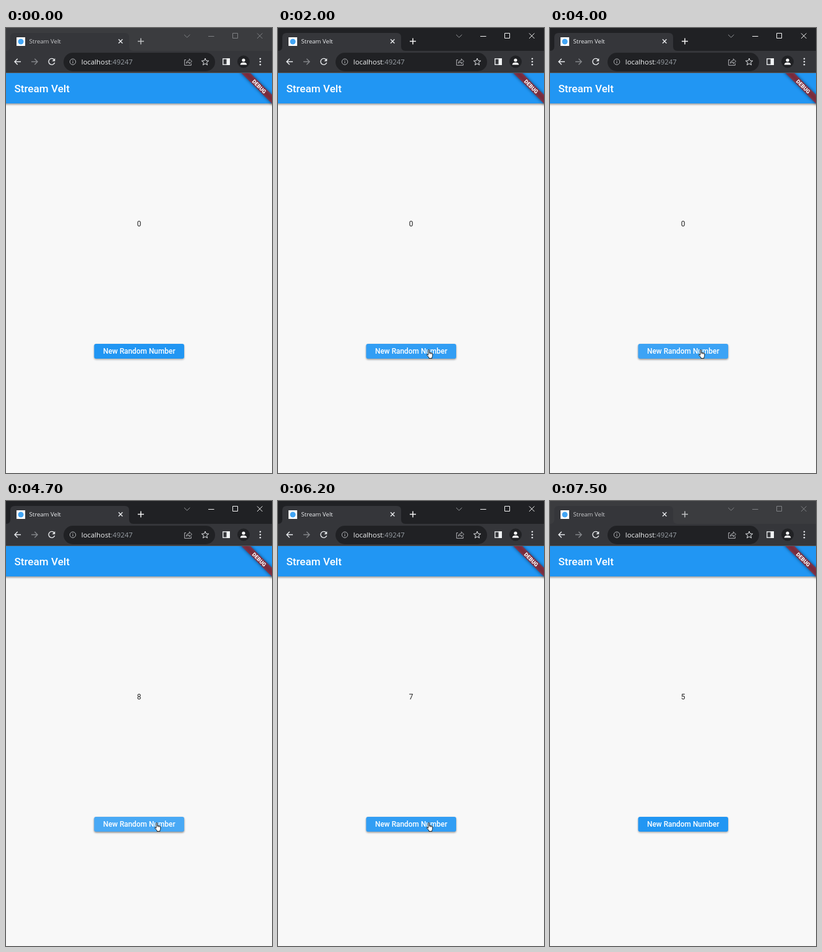
An HTML page for the animation above (7600 ms loop, 430 by 720 pixels).

```html
<!DOCTYPE html>
<html lang="en">
<head>
<meta charset="utf-8">
<title>Random number stream</title>
<style>
html, body { margin: 0; width: 100%; height: 100%; overflow: hidden; background: #f8f8f8; }
svg { display: block; }
.ui { font-family: "Open Sans", "Noto Sans", sans-serif; }
.app { font-family: Roboto, sans-serif; }
.line { fill: none; stroke: #e8eaed; stroke-width: 1.4; }
.thin { stroke-width: 1; }
#strip { fill: #3b3c3f; }
#tabTitle { fill: #c9cacc; }
#plus { stroke: #c0c1c3; }
#controls { stroke: #7f8184; }
.active #strip { fill: #202124; }
.active #tabTitle { fill: #eceef0; }
.active #plus, .active #controls { stroke: #f4f4f4; }
.active #chevron { stroke: #96989b; }
</style>
</head>
<body>
<svg id="stage" width="430" height="720" viewBox="0 0 430 720">
  <defs>
    <filter id="soft" x="-30%" y="-100%" width="160%" height="300%"><feGaussianBlur stdDeviation="1.6"/></filter>
    <filter id="blur" x="-30%" y="-100%" width="160%" height="300%"><feGaussianBlur stdDeviation="2.6"/></filter>
    <clipPath id="page"><rect y="73" width="430" height="647"/></clipPath>
    <clipPath id="face"><rect x="142.5" y="511" width="145.5" height="24" rx="3.2"/></clipPath>
  </defs>
  <rect width="430" height="720" fill="#f8f8f8"/>

  <g class="ui">
    <rect id="strip" width="430" height="37"/>
    <path d="M0 37Q7 37 7 30V15Q7 8 14 8H192Q199 8 199 15V30Q199 37 206 37H430V73H0Z" fill="#35363a"/>
    <rect x="17" y="15" width="14" height="14" fill="#fff"/>
    <circle cx="24" cy="22" r="4.5" fill="#42a5f5"/>
    <text id="tabTitle" x="37.5" y="25.3" font-size="9.6">Stream Velt</text>
    <path class="line" d="M182 18.3l6.4 6.4m0-6.4l-6.4 6.4"/>
    <path id="plus" d="M213 21.5h10m-5-5v10" stroke-width="1.5"/>
    <g id="controls" fill="none">
      <path id="chevron" d="M288 10.8l4.7 4.5 4.7-4.5"/>
      <path d="M327 13.5h9.5M366.5 8.500h8v8h-8zM406 8.500l8.500 8.500m0-8.500l-8.500 8.500"/>
    </g>

    <path class="line" d="M24 54.500H14m4.700-4.700L14 54.500l4.700 4.700"/>
    <path class="line" d="M41 54.500h10m-4.700-4.700l4.700 4.700-4.700 4.700" style="stroke:#85878b"/>
    <path class="line" d="M77.900 51.300A5 5 0 1 0 78.700 56"/>
    <path d="M79.300 49v4.800h-4.800z" fill="#e8eaed"/>
    <rect x="93" y="40" width="245" height="30" rx="15" fill="#202124"/>
    <g class="line thin" style="stroke:#b4b6b9">
      <circle cx="108" cy="54.700" r="4.700"/>
      <path d="M108 53.900v3.300m0-5.200v1.100"/>
      <path d="M291 51.500h-2.300v8.800h10.600v-3M291.300 57q.5-4.200 5-4.500v-2.600l4.200 4-4.200 4v-2.500q-3.300 0-5 1.600z"/>
    </g>
    <text x="121.800" y="58.800" font-size="11.350" fill="#f1f3f4">localhost<tspan fill="#9aa0a6">:49247</tspan></text>
    <path id="star" class="line thin"/>
    <rect x="350.800" y="49.800" width="10.400" height="9.400" class="line"/>
    <rect x="356.500" y="49" width="5.400" height="11" fill="#f1f3f4"/>
    <circle cx="384" cy="54.500" r="10" fill="#202124"/>
    <circle cx="384" cy="52" r="2.600" fill="#fff"/>
    <path d="M378.700 59.600q0-3.800 5.300-3.800t5.300 3.800z" fill="#fff"/>
    <g fill="#e8eaed"><circle cx="411" cy="49.800" r="1.300"/><circle cx="411" cy="54.500" r="1.300"/><circle cx="411" cy="59.200" r="1.300"/></g>
    <rect y="72" width="430" height="1" fill="#55585c"/>
  </g>

  <g class="app" clip-path="url(#page)">
    <rect x="-9" y="76" width="448" height="48" fill="#000" opacity=".36" filter="url(#soft)"/>
    <rect y="73" width="430" height="49" fill="#2196f3"/>
    <text x="13.500" y="104.300" font-size="17.100" font-weight="500" fill="#fff">Stream Velt</text>
    <g transform="translate(430 74) rotate(45)">
      <rect x="-40" y="24" width="80" height="10.300" opacity=".55" filter="url(#blur)"/>
      <rect x="-40" y="24" width="80" height="10.300" fill="#b71c1c" fill-opacity=".63"/>
      <text y="32.300" font-size="8.700" font-weight="900" fill="#fff" text-anchor="middle">DEBUG</text>
    </g>
    <text id="number" x="215" y="321" font-size="12" fill="#222" text-anchor="middle">0</text>

    <rect id="shade" x="142.500" y="512.500" width="145.500" height="24" rx="3.200" filter="url(#soft)"/>
    <g clip-path="url(#face)">
      <rect x="142" y="510" width="147" height="26" fill="#2196f3"/>
      <rect id="tint" x="142" y="510" width="147" height="26" fill="#fff"/>
      <circle id="splash" cy="523" fill="#fff"/>
    </g>
    <text x="215.300" y="527.200" font-size="11.900" font-weight="500" fill="#fff" text-anchor="middle">New Random Number</text>
  </g>

  <g id="hand" fill="#fff" stroke="#111" stroke-width=".9" stroke-linejoin="round">
    <path d="M2.800 8.500V1.600q0-1.100 1-1.100t1 1.100v3.600l4 .8q1 .3 1 1.300v3q0 1.400-.9 2.500v1.700H4v-1.500L.9 9.600Q.2 8.400 1 8t1.800 1.400z"/>
    <path d="M4.800 5v2.400M6.500 5.600v2M8.200 6v1.800" stroke-width=".7"/>
  </g>
  <path id="arrow" d="M0 0V9.600L2.200 7.600 3.800 11 5.200 10.400 3.700 7H6.600Z" fill="#fff" stroke="#111" stroke-width=".8"/>
</svg>
<script>
const LOOP = 7600, STEP = 100;
const FOCUS = [1200, 7500];
const HOVER = [1800, 6800];
// press time and the number it brings
const CLICKS = [[2300, 3], [2900, 6], [3500, 0], [4300, 8], [5100, 0], [5600, 7], [6300, 5]];
const RELEASE = 100;
// time, x, y of the pointer tip
const PATH = [
  [1100, 300, 636], [1300, 300, 636], [1700, 262, 556], [1800, 250, 521],
  [2000, 243, 520], [6700, 243, 520], [6800, 268, 556], [7000, 346, 676], [7100, 346, 676]
];

const $ = id => document.getElementById(id);
const stage = $('stage');
const clamp = v => Math.max(0, Math.min(1, v));
const ramp = (t, a, b) => clamp((t - a) / (b - a));
const mix = (a, b, p) => a + (b - a) * p;
const within = (t, [a, b]) => t >= a && t < b;
const set = (id, attrs) => {
  for (const key in attrs) $(id).setAttribute(key, attrs[key]);
};

function starPath(cx, cy, outer, inner) {
  const points = Array.from({ length: 10 }, (_, i) => {
    const r = i % 2 ? inner : outer, a = i * Math.PI / 5 - Math.PI / 2;
    return (cx + r * Math.cos(a)).toFixed(2) + ' ' + (cy + r * Math.sin(a)).toFixed(2);
  });
  return 'M' + points.join('L') + 'Z';
}

function pointer(t) {
  const i = PATH.findIndex((p, n) => n && t < p[0]);
  if (i < 1 || t < PATH[0][0]) return null;
  const a = PATH[i - 1], b = PATH[i], p = ramp(t, a[0], b[0]);
  return [mix(a[1], b[1], p), mix(a[2], b[2], p)];
}

function drawButton(t) {
  const over = within(t, HOVER);
  const hover = over ? 0.08 * ramp(t, HOVER[0], HOVER[0] + 150) : 0;
  const press = CLICKS.map(c => c[0]).filter(c => c <= t).pop();
  const age = press === undefined ? 9999 : t - press;
  const held = ramp(age, -50, 100) * (1 - ramp(age, 300, 567));
  const grow = clamp(age / 270);
  set('tint', { opacity: over ? mix(hover, 0.24, held) : 0 });
  set('splash', {
    cx: mix(245, 215, grow),
    r: 82 * grow,
    opacity: over ? 0.24 * (1 - ramp(age, 200, 375)) : 0
  });
  set('shade', { opacity: over ? mix(0.4, 0.5, held) : 0.32 });
}

function drawPointer(t) {
  const at = pointer(t), hand = within(t, HOVER);
  for (const id of ['hand', 'arrow']) {
    const shown = at && hand === (id === 'hand');
    set(id, { visibility: shown ? 'visible' : 'hidden' });
    if (shown) set(id, { transform: `translate(${at[0] - (hand ? 3 : 0)} ${at[1]})` });
  }
}

function draw(now) {
  const t = Math.floor(now % LOOP / STEP) * STEP;
  stage.classList.toggle('active', within(t, FOCUS));
  const last = CLICKS.filter(c => c[0] + RELEASE <= t).pop();
  $('number').textContent = last ? last[1] : 0;
  drawButton(t);
  drawPointer(t);
}

set('star', { d: starPath(322, 55, 6, 2.6) });
const start = performance.now();
function tick() {
  draw(performance.now() - start);
  requestAnimationFrame(tick);
}
tick();
</script>
</body>
</html>
```
